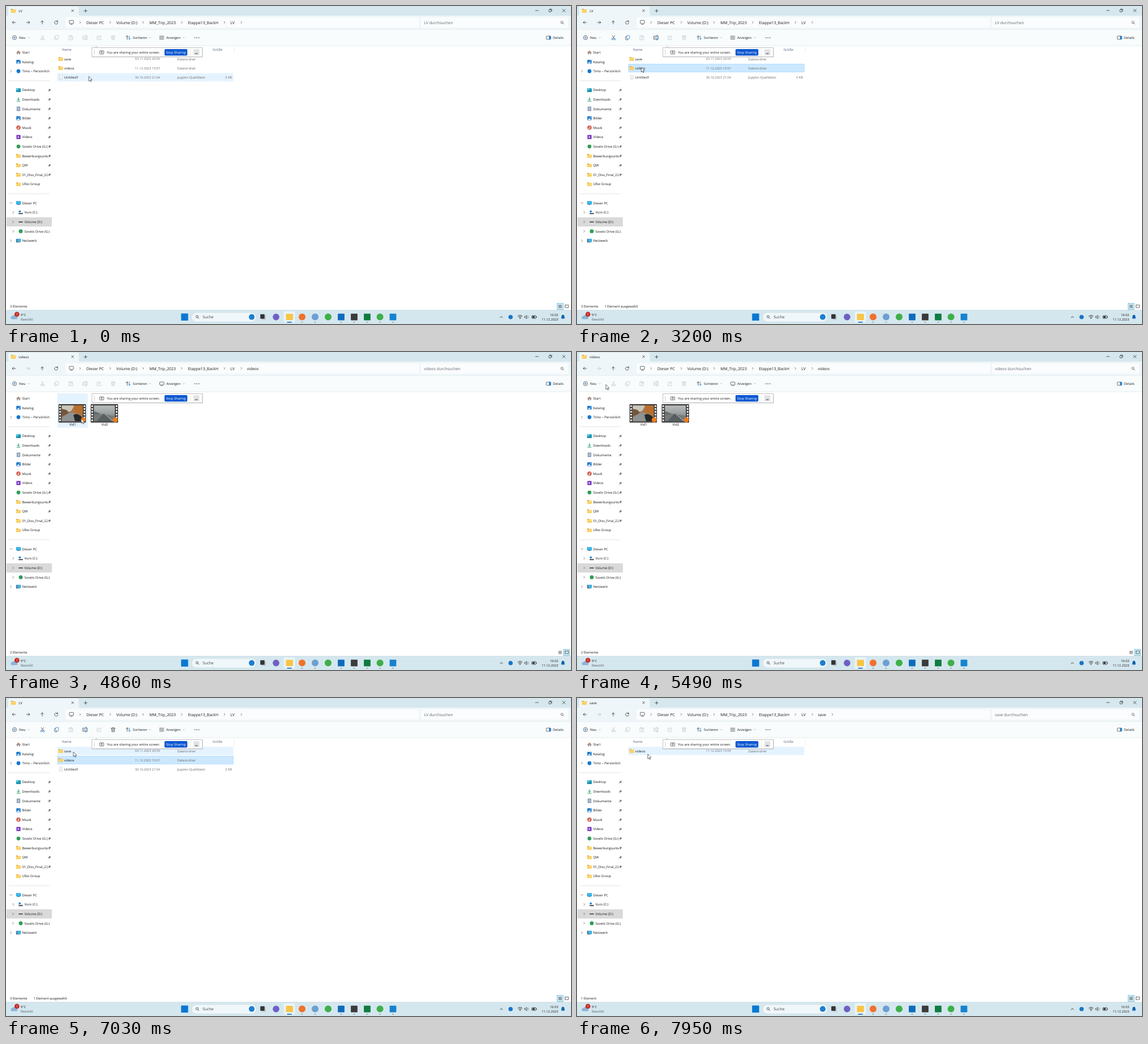
An HTML page for the animation above (8000 ms loop, 998 by 561 pixels).

```html
<!DOCTYPE html>
<html lang="de">
<head>
<meta charset="utf-8">
<title>Explorer</title>
<style>
html,body{margin:0;width:100%;height:100%;overflow:hidden;background:#fff}
svg{display:block}
text{font-family:"Open Sans","Noto Sans",sans-serif;white-space:pre}
</style>
</head>
<body>
<svg id="stage" width="998" height="561" viewBox="0 0 998 561" text-rendering="geometricPrecision">
<defs>
<linearGradient id="fog" x1="0" y1="0" x2="0" y2="1"><stop offset="0" stop-color="#b9bcbc"/><stop offset=".5" stop-color="#9a9f9f"/><stop offset="1" stop-color="#5d6463"/></linearGradient>
<linearGradient id="fold" x1="0" y1="0" x2="0" y2="1"><stop offset="0" stop-color="#ffdf85"/><stop offset="1" stop-color="#f7c649"/></linearGradient>
<clipPath id="pinned"><rect x="0" y="70" width="73.6" height="300"/></clipPath>
</defs>
<g id="back"></g><g id="view"></g><g id="front"></g>
<path id="cursor" d="M0 0V8.4L2 6.6L3.3 9.6L4.6 9L3.4 6.2H6Z" fill="#fff" stroke="#111" stroke-width=".6"/>
</svg>
<script>
const $ = id => document.getElementById(id);
const INK = '#1c1c1c', GREY = '#6b6b6b', OFF = '#bcc3c7', BLUE = '#0f6cbd';
const SIZE = 5.9, BIG = 6.9;

const rect = (x, y, w, h, fill, r = 0, more = '') =>
  `<rect x="${x}" y="${y}" width="${w}" height="${h}" rx="${r}" fill="${fill}" ${more}/>`;
const box = (x, y, w, h, line, r = .6, fill = 'none', sw = .7) =>
  rect(x, y, w, h, fill, r, `stroke="${line}" stroke-width="${sw}"`);
const dot = (x, y, r, fill, more = '') => `<circle cx="${x}" cy="${y}" r="${r}" fill="${fill}" ${more}/>`;
const line = (d, c = INK, w = .7, fill = 'none') =>
  `<path d="${d}" fill="${fill}" stroke="${c}" stroke-width="${w}" stroke-linecap="round" stroke-linejoin="round"/>`;
const shape = (d, fill) => `<path d="${d}" fill="${fill}"/>`;
const text = (x, y, s, size = SIZE, fill = INK, more = '') =>
  `<text x="${x}" y="${y}" font-size="${size}" fill="${fill}" ${more}>${s}</text>`;
const at = (x, y, s, more = '') => `<g transform="translate(${x} ${y}) ${more}">${s}</g>`;

const chevron = (x, y, turn = 0, c = '#555', s = 1) =>
  at(x, y, line('M-.9-1.8L.9 0L-.9 1.8', c, .7), `rotate(${turn}) scale(${s})`);
const arrow = (x, y, turn = 0, c = INK, s = 1) =>
  at(x, y, line('M2.9 0H-2.9M-.5-2.4L-2.9 0L-.5 2.4', c, .7), `rotate(${turn}) scale(${s})`);
const folder = (x, y) => at(x, y,
  shape('M-4.3-3.3h3l1.2 1.1h4.4v2h-8.6z', '#e3a52c') + rect(-4.3, -1.7, 8.6, 5.2, 'url(#fold)', .5));
const lens = (x, y, c = INK) => at(x, y, dot(-.5, -.5, 2, 'none', `stroke="${c}" stroke-width=".7"`) + line('M1 1L2.7 2.7', c));
const pin = (x, y) => at(x, y, shape('M.4-2.7L2.7-.4L1.9-.1L.7 1.2L.4 2.3L-2.3-.4L-1.2-.7L.1-1.9Z', '#737a7e') + line('M-1.2 1.2L-2.5 2.5', '#737a7e', .6));
const screen = (x, y) => at(x, y, rect(-4.3, -3.4, 8.6, 6, '#1793d4', .6) + rect(-3.5, -2.7, 7, 4.5, '#39bdee') + rect(-2, 2.6, 4, .9, '#5f7583'));

const icons = {
  home: line('M-3.8.2L0-3.3L3.8.2', '#d2733a', 1) + shape('M-2.9 0L0-2.6L2.9 0V3.5H.9V1H-.9V3.5H-2.9Z', '#8a9099'),
  photo: rect(-3.9, -3.7, 7.8, 7.4, '#1675c7', .8) + shape('M-3.3 3.2L-.2-.2L3.3 3.2Z', '#e4f3ff') + dot(1.7, -1.7, .8, '#fff'),
  cloud: dot(0, 0, 3.6, '#1578d0'),
  desktop: rect(-4.3, -3.2, 8.6, 6.6, '#159bb8', .8) + rect(-3.4, -2.4, 3, 2.6, '#6ad6e3') + rect(-4.3, 2.3, 8.6, 1.1, '#0f6f95'),
  down: line('M0-3.5V1.5M-2.3-.7L0 1.6L2.3-.7M-3.2 3.5H3.2', '#15935b', 1),
  doc: rect(-3.3, -4, 6.6, 8, '#7d93ab', .6) + line('M-1.8-1.8H1.8M-1.8 0H1.8M-1.8 1.8H1.8', '#fff', .7),
  music: dot(0, 0, 4, '#cf5c4c') + dot(-.7, 1.4, 1, '#fff') + line('M.2 1.4V-2L1.6-1.4', '#fff', .7),
  film: rect(-3.9, -3.8, 7.8, 7.6, '#7a35c1', .7) + shape('M-1.1-1.7L1.8 0L-1.1 1.7Z', '#fff') + line('M-3-2.6V2.8', '#c79df0', .6),
  drive: dot(0, 0, 3.6, '#2f9d58'),
  folder: folder(0, 0),
  pc: screen(0, 0),
  disk: rect(-3.6, -3.4, 3.6, 3.2, '#1683d8') + rect(-4, 1, 8, 2.4, '#57616a', .4),
  volume: rect(-4, -.9, 8, 2.2, '#565d63', .5),
  net: screen(0, 0) + rect(-4.4, -3.2, 2.6, 6.6, '#61798b', .4)
};

// name, icon, y, pinned, chevron direction (-1 none), indent
const side = [
  ['Start', 'home', 82], ['Katalog', 'photo', 98.4], ['Timo – Persönlich', 'cloud', 115, 0, 0],
  ['Desktop', 'desktop', 148.2, 1], ['Downloads', 'down', 164.7, 1], ['Dokumente', 'doc', 181.4, 1],
  ['Bilder', 'photo', 198, 1], ['Musik', 'music', 214.6, 1], ['Videos', 'film', 231.2, 1],
  ['Sovelo Drive (G:)', 'drive', 247.8, 1], ['Bewerbungsunterlagen', 'folder', 264.5, 1],
  ['QW', 'folder', 281, 1], ['01_Diss_Final_22', 'folder', 297.6, 1], ['Ulbo Group', 'folder', 314.3],
  ['Dieser PC', 'pc', 347.5, 0, 90], ['Vuro (C:)', 'disk', 364.1, 0, 0, 4], ['Volume (D:)', 'volume', 380.8, 0, 0, 4],
  ['Sovelo Drive (G:)', 'drive', 397.4, 0, 0, 4], ['Netzwerk', 'net', 414, 0, 0]
];

function sidebar() {
  const rows = side.map(([name, icon, y, pinned, turn = -1, dx = 0]) =>
    at(22 + dx, y, icons[icon], 'scale(.95)') +
    text(28.4 + dx, y + 2.1, name, SIZE, INK, pinned ? 'clip-path="url(#pinned)"' : '') +
    (pinned ? pin(76.7, y + .2) : '') + (turn >= 0 ? chevron(8.8 + dx, y, turn) : ''));
  return rect(1, 372.8, 80, 16.2, '#d9d9d9', 1) + line('M5 131.8H77M5 331.2H77', '#dedede', .8) + rows.join('');
}

function chrome() {
  const crumbs = [['Dieser PC', 142, 184.3], ['Volume (D:)', 194.8, 242.3], ['MM_Trip_2023', 253.3, 310.5], ['Etappe13_BackH', 321.4, 386], ['LV', 396.3, 415.8]];
  return rect(0, 0, 998, 17, '#d6e8ee') + rect(0, 17, 998, 25, '#eff6f9') +
    shape('M2 17Q4 17 4 14V3.5Q4 1 6.5 1H126Q128.500 1 128.500 3.500V14Q128.500 17 131 17Z', '#eff6f9') +
    rect(0, 42, 998, 28, '#f9fcfd') + rect(0, 41.4, 998, .7, '#e3ebee') + rect(0, 69.6, 998, .8, '#dfe5e8') +
    rect(105, 20, 625, 18.4, '#fafcfd', 2) + rect(733, 20, 260, 18.4, '#fafcfd', 2) +
    folder(13, 8.3) + line('M115.800 6.400l3.600 3.600m0-3.600l-3.600 3.600M138 8.600h5.200M140.600 6v5.200') +
    line('M935.300 8h5M983 5.600l4.800 4.800m0-4.800l-4.800 4.800') +
    box(958.900, 6.400, 4, 4, INK, .8) + line('M960.300 5.300h2.700q1 0 1 1v2.700') +
    arrow(64, 29, 90) + line('M91 27.500A2.900 2.900 0 1 0 91.500 29.600M91.300 25.800V27.700H89.400') +
    box(111.800, 25.400, 7.400, 5.300, '#333') + line('M113.800 32.500h3.400', '#333') +
    chevron(131, 29) + crumbs.map(([s, x, c]) => text(x, 31.500, s, BIG) + chevron(c, 29)).join('') +
    lens(982.5, 29.3, '#444') +
    dot(15, 55.8, 3.600, 'none', 'stroke="#333" stroke-width=".7"') + line('M13.200 55.800h3.600M15 54v3.600', BLUE) +
    text(23, 58, 'Neu') + chevron(40.2, 55.9, 90, '#888', .8) +
    line('M214 59V52.600M212 54.600L214 52.600L216 54.600', INK) + line('M218 52.600V59M216.300 57L218 59L219.800 57', BLUE) +
    text(224, 58, 'Sortieren') + chevron(254.300, 55.900, 90, '#888', .8) +
    text(283, 58, 'Anzeigen') + chevron(314, 55.900, 90, '#888', .8) +
    [333.700, 337.200, 340.700].map(x => dot(x, 56, .8, INK)).join('') +
    box(954.300, 53, 8, 5.800, '#333', 1) + rect(959, 53, 3.300, 5.800, '#2b88d8') + text(966, 58, 'Details');
}

function taskbar() {
  const apps = [[523, '#f0712c', 1], [546, '#6d9fd3', 1], [569, '#3eb049', 0], [660.6, '#3eb049', 1]];
  const squares = [[592, '#0f6cbd'], [615, '#3b3b3b'], [638, '#107c41'], [683.5, '#1683d0']];
  const mark = x => rect(x - 1.600, 557.300, 3.200, 1.200, '#84939b', .6);
  return rect(0, 536.5, 998, 24.5, '#d5e7ee') + rect(0, 536.2, 998, .6, '#c3d3da') +
    shape('M11 552.500a2.800 2.800 0 0 1 .3-5.600a4 4 0 0 1 7.200 1a2.400 2.400 0 0 1 .3 4.600Z', '#8db4d8') +
    dot(19.3, 543.9, 4.3, '#c62b25') + text(19.3, 546, '1', 5.8, '#fff', 'text-anchor="middle"') +
    text(26, 546.8, '9°C', 5.7) + text(26, 555, 'Bewölkt', 5.9, '#5b656a') +
    rect(309.3, 542.500, 12.400, 12.400, '#0a78d3', .6) +
    rect(328, 540.800, 114, 16.200, '#f0f7fa', 8.100, 'stroke="#c7d8df" stroke-width=".5"') +
    lens(338, 548.600) + text(347.300, 551.300, 'Suche', BIG, '#444') + dot(434, 548.600, 5, '#1c7fd1') +
    rect(451.500, 545.600, 7.500, 8, '#c3c9cc', .6) + rect(449.200, 543.800, 7.500, 8, '#333', .6) +
    dot(477, 548.600, 5.800, '#6f60c4') +
    rect(490.700, 538.700, 19.600, 19.600, '#eaf4f8', 2) + rect(494.500, 543, 12.400, 11.200, '#f8c545', 1) + rect(496.300, 557, 8.600, 1.500, '#0067c0', .7) +
    apps.map(([x, c, on]) => dot(x, 548.6, 6, c) + (on ? mark(x) : '')).join('') +
    squares.map(([x, c]) => rect(x - 5.9, 542.7, 11.8, 11.8, c, 1) + mark(x)).join('') +
    chevron(875, 548.700, -90, INK, 1.200) + dot(891.300, 548.700, 3.800, '#1b75c4') +
    line('M904.200 547.200Q908 543.800 911.800 547.200M905.700 549Q908 547 910.300 549', INK, .9) + dot(908, 550.900, .9, INK) +
    line('M916.500 547.500h1.300l2-1.800v6l-2-1.800h-1.300z', INK, .7) + line('M921.300 547.300q1 1.300 0 2.700M922.600 546.300q1.800 2.300 0 4.700', '#7d8a90', .6) +
    box(928.800, 546.300, 7.400, 4.800, INK, 1, 'none', .8) + rect(930, 547.400, 3.800, 2.600, INK) + rect(936.600, 547.600, .8, 2.200, INK) +
    text(975.4, 555, '11.12.2023', 5.7, INK, 'text-anchor="end"') +
    shape('M980.300 551.200Q981.200 550.300 981.200 548Q981.200 545 983.800 544.800Q986.400 545 986.400 548Q986.400 550.300 987.300 551.200ZM982.500 551.800H985.100Q983.800 553.400 982.500 551.800Z', '#0a62b0');
}

function shareBar() {
  return rect(152.500, 74.500, 195.500, 16.300, '#000', 0, 'opacity=".1"') + box(151.800, 73.500, 195, 15.900, '#aeb1b3', 0, '#fff', .8) +
    [78.800, 81.700, 84.600].map(y => dot(156, y, .6, '#777')).join('') +
    box(165.500, 79, 7.200, 5.600, '#333', .7) + line('M169.100 83.300V80.400M167.800 81.600L169.100 80.300L170.400 81.600', '#333', .8) +
    text(178.200, 84, 'You are sharing your entire screen.', 5.800) +
    rect(280, 76, 40.300, 11.500, '#0b57d0', 1.800) + text(300.100, 84, 'Stop Sharing', 5.850, '#fff', 'text-anchor="middle"') +
    rect(325.600, 75.500, .6, 12, '#d8d8d8') + rect(331, 76.300, 10.500, 10.700, '#e0e3e5', 1) + line('M334.500 84h3.600', INK, .9);
}

function tools(on, del) {
  const c = on ? '#333' : OFF, a = on ? BLUE : OFF, d = del ? '#333' : OFF;
  return at(64.5, 55.8, line('M-2.200-3.700L1.500 1.700M2.200-3.700L-1.500 1.700', c) + dot(-2, 2.700, 1.300, 'none', `stroke="${a}" stroke-width=".8"`) + dot(2, 2.700, 1.300, 'none', `stroke="${a}" stroke-width=".8"`)) +
    at(89.3, 55.8, box(-1.600, -3.800, 5.200, 6, a, 1) + line('M-2.200-2.200Q-3.600-2.200-3.600-.8V2.400Q-3.600 3.800-2.200 3.800H1', c)) +
    at(114.2, 55.8, line('M-1.200-3H-3.200V3.800H-.8M1.200-3H3.200V-1.500', OFF) + box(-1.300, -3.900, 2.600, 1.500, OFF) + box(0, -1, 3.700, 5, OFF)) +
    at(139.5, 55.8, line('M.8-2.700H-3.900V2.700H.8M2.800-2.700H4V2.700H2.800', c) + line('M1.800-4V4M.8-4H2.800M.8 4H2.800', a) + line('M-2.500 1.300L-1.200-1.400L.1 1.300', a, .6)) +
    at(164.4, 55.8, line('M-.8-2.700H-3.500V3.600H3.200V1.500M-1.500 1Q-1-1.800 2-1.800M1-3.800L3.300-1.800L1 .2', OFF)) +
    at(189.2, 55.8, line('M-3.600-2.500H3.600M-2.800-2.500L-2.200 3.800H2.200L2.800-2.500M-1.200-2.700Q-1.200-4 0-4Q1.200-4 1.200-2.700M-.8-.8V2M.8-.8V2', d));
}

const lists = {
  LV: [['save', '03.11.2023 20:59'], ['videos', '11.12.2023 15:57'], ['Untitled1', '30.10.2023 21:04', '3 KB']],
  save: [['videos', '11.12.2023 15:59']]
};

function listing(s) {
  const head = '#4c607a';
  const rows = lists[s.place].map(([name, date, size], i) => {
    const y = 93.4 + 16.1 * i;
    const bar = i === s.sel ? box(90.9, y - 6.9, 310.4, 13.8, '#99d1ff', 0, '#cce8ff', .6)
      : i === s.hover ? rect(90.5, y - 7.2, 311, 14.4, '#e5f3ff') : '';
    const icon = size ? at(97, y, box(-2.6, -3.6, 5.2, 7.2, '#bdbdbd', 0, '#fff', .5) + line('M-1.300-.8H1.300M-1.300.7H1.300M-1.300 2.200H1', '#b9c4cc', .4))
      : at(96.7, y, icons.folder, 'scale(.95)');
    return bar + icon + text(102.8, y + 2.1, name) + text(227.7, y + 2, date, 5.6, GREY) +
      text(302.5, y + 2.1, size ? 'Jupyter-Quelldatei' : 'Dateiordner', 5.85, GREY) +
      (size ? text(399, y + 2.1, size, 5.8, GREY, 'text-anchor="end"') : '');
  });
  return text(99, 79, 'Name', SIZE, head) + text(365, 79, 'Größe', SIZE, head) +
    chevron(159.500, 71.800, -90, '#777', .8) + rect(402.800, 71, .7, 12.500, '#e3e3e3') + rows.join('');
}

function thumb(x, photo, name) {
  let holes = '';
  for (let i = 0; i < 6; i++)
    holes += rect(-22.9, -14.2 + i * 5, 2.7, 3, '#f4f4f4', .5) + rect(20.2, -14.2 + i * 5, 2.7, 3, '#f4f4f4', .5);
  return at(x, 108.3, rect(-24.2, -16.2, 48.4, 32.4, '#3c3c3c', .8) + holes + photo + dot(19.3, 11.3, 4.4, '#ee7d1b')) +
    text(x + .7, 130.4, name, SIZE, INK, 'text-anchor="middle"');
}
const forest = rect(-18.5, -14, 37, 28, '#a9794c') + shape('M-18.500-14H4L-2-4L-18.500 0Z', '#c9c6bb') +
  shape('M-18.500-8L-10-6L-5 0L-18.500 5Z', '#73553a') + shape('M2-14H18.500V2L6-1Z', '#b96e2c') +
  shape('M-6-1H3L16 14H-18.500V8Z', '#8e9293') + shape('M2 3Q8-1 14 4L18.500 8V14H5Z', '#25292b');
const mist = rect(-18.5, -14, 37, 28, 'url(#fog)') + shape('M-18.500 2L-3 1L18.500 5V14H-18.500Z', '#747a79') +
  shape('M-18.500-4L-6 1L-18.500 3Z', '#656d6a') + shape('M-2 1H1L14 14H-14Z', '#585f60') + line('M1 1.500L15 13.500', '#d9dcda', .7);

function tiles(s) {
  const bar = s.hover < 0 ? '' : rect(90.6 + 56.7 * s.hover, 73, 54, 60.4, '#e5f3ff');
  return bar + (s.loading ? '' : thumb(117, forest, 'Vid1') + thumb(173.8, mist, 'Vid2'));
}

function tooltip(a) {
  const rows = ['Erstelldatum: 30.10.2023 21:01', 'Größe: 535 MB', 'Dateien: Vid1, Vid2'];
  return `<g opacity="${a}">` + rect(115, 120.500, 87.800, 24.600, '#000', .5, 'opacity=".18"') +
    box(114, 119.500, 87.300, 24, '#bcbcbc', .5, '#f9f9f9', .6) +
    rows.map((r, i) => text(116.4, 125 + 7.8 * i, r, 5.7, '#575757')).join('') + '</g>';
}

function toggles(grid) {
  const x = grid ? 984.800 : 973.400;
  return box(x, 524.600, 10.800, 11, '#75bcd8', 0, '#cfeaf4', .8) +
    line('M976.200 528h5.200M976.200 530h5.200M976.200 532h5.200', '#333', .8) + box(987.500, 527.300, 5.800, 4.800, '#333', 0);
}

function scene(s) {
  const grid = s.place === 'videos', picked = s.sel >= 0;
  const count = grid ? 2 : lists[s.place].length;
  return text(22.300, 10.700, s.place, 6) + arrow(14, 29, 0, INK, s.press ? .75 : 1) +
    arrow(39, 29, 180, s.place === 'LV' ? INK : '#a9b2b6') +
    (s.place === 'LV' ? '' : text(425.500, 31.500, s.place, BIG) + (grid ? '' : chevron(451.300, 29))) +
    text(738.300, 31.500, s.place + ' durchsuchen', BIG, '#606568') + tools(picked, s.del) +
    (grid ? box(271.500, 53, 7.500, 5, '#333') + line('M273.500 59.500h3.500', BLUE)
      : line('M271.200 53.300h7.600M271.200 55.800h7.600M271.200 58.300h7.600', '#333', .8)) +
    (grid ? tiles(s) : listing(s)) + (s.tip ? tooltip(s.tip) : '') +
    text(7, 532.300, count + (count > 1 ? ' Elemente' : ' Element'), 5.850) +
    (picked ? text(48.500, 532.300, '1 Element ausgewählt', 5.800) : '') + toggles(grid) +
    text(975.400, 546.800, s.clock, 5.700, INK, 'text-anchor="end"');
}

// start, end, steps, target x, target y
const moves = [
  [90, 360, 4, 113.5, 108], [3850, 4120, 4, 184.5, 124], [4400, 4680, 4, 118, 118], [4860, 5040, 3, 176, 116],
  [5310, 5490, 3, 51, 57.5], [5580, 5940, 5, 13.5, 29], [6300, 7030, 9, 119, 95], [7580, 7950, 5, 125, 99]
];

function pointer(t) {
  let x = 146.3, y = 124;
  for (const [a, b, n, tx, ty] of moves) {
    if (t < a) break;
    const step = Math.min(n, 1 + Math.floor((t - a + 3) * (n - 1) / (b - a)));
    const p = step / n, e = p * p * (3 - 2 * p);
    x += (tx - x) * e;
    y += (ty - y) * e;
  }
  return [x, y];
}

function stateAt(t, x, y) {
  const place = t >= 7580 ? 'save' : t >= 3480 && t < 6300 ? 'videos' : 'LV';
  let hover = -1;
  if (place === 'videos') {
    if (y > 73 && y < 134 && x > 90) hover = x < 146 ? 0 : x < 202 ? 1 : -1;
  } else if (x > 90 && x < 402 && y > 85.3) hover = Math.floor((y - 85.3) / 16.1);
  const sel = place !== 'LV' || t < 3200 ? -1 : t >= 7400 ? 0 : 1;
  return {
    place, hover, sel,
    del: sel >= 0 && t >= 3290,
    loading: t >= 3480 && t < 3570,
    press: t >= 6120 && t < 6300,
    tip: t < 1210 || t >= 3200 ? 0 : t < 1300 ? .35 : t < 1390 ? .7 : 1,
    clock: t < 5310 ? '16:02' : '16:03'
  };
}

$('back').innerHTML = rect(0, 0, 998, 561, '#fff') + chrome() + sidebar() + taskbar();
$('front').innerHTML = shareBar();

let last = '';
function draw(t) {
  const [x, y] = pointer(t), s = stateAt(t, x, y), key = JSON.stringify(s);
  if (key !== last) $('view').innerHTML = scene(s);
  last = key;
  $('cursor').setAttribute('transform', `translate(${x.toFixed(2)} ${y.toFixed(2)})`);
}

const begin = performance.now();
function tick() {
  draw((performance.now() - begin) % 8000);
  requestAnimationFrame(tick);
}
tick();
</script>
</body>
</html>
```
